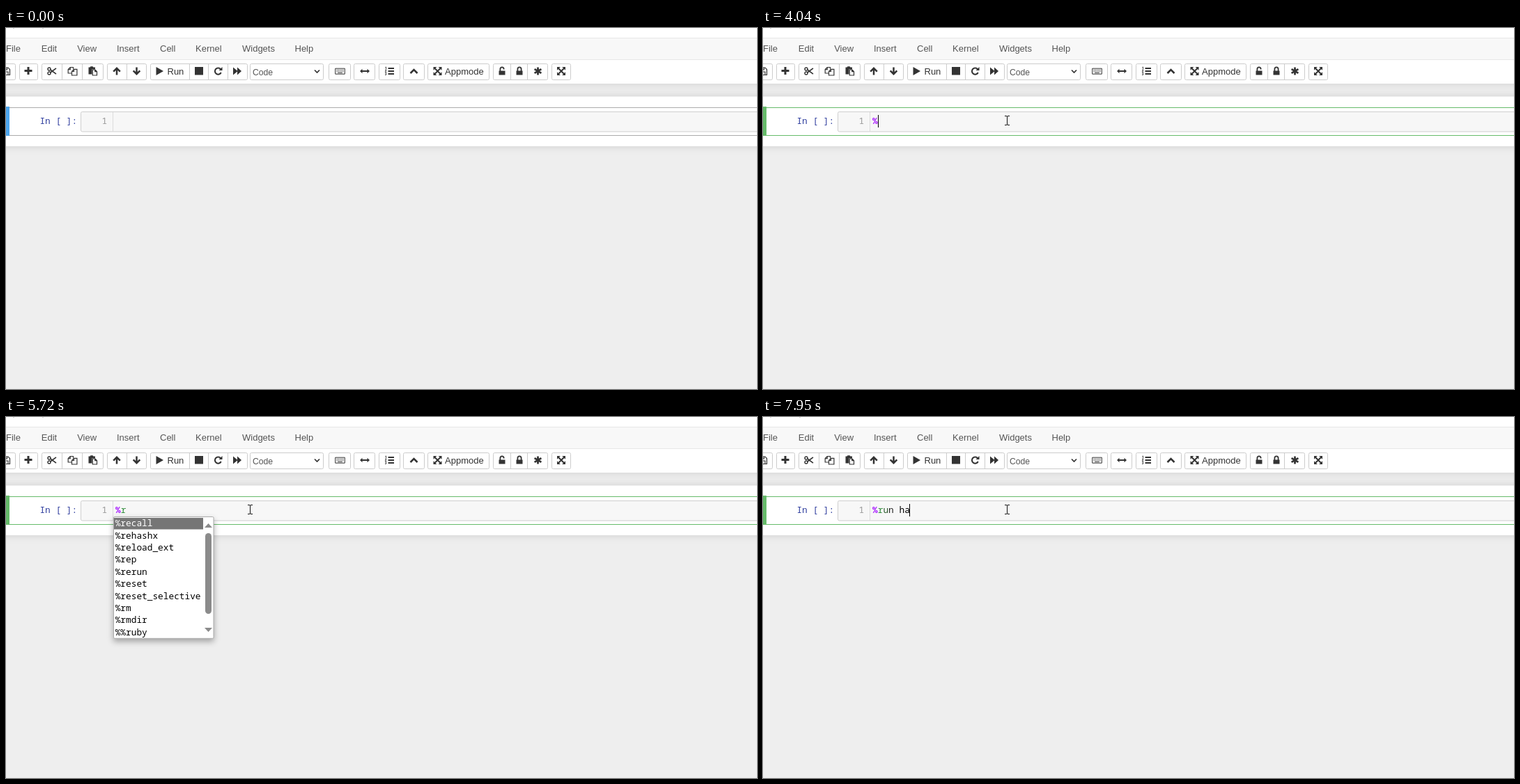
Animation, 1078 px wide and 519 px high, one loop 8 s. Source, as an HTML page:

```html
<!DOCTYPE html>
<html lang="en">
<head>
<meta charset="utf-8">
<title>Notebook cell</title>
<style>
  html, body { margin: 0; width: 100%; height: 100%; overflow: hidden; background: #eee; }
  svg { display: block; width: 1078px; height: 519px; }
  text { white-space: pre; }
  .ui { font: 13px "Liberation Sans", Arial, sans-serif; fill: #333; }
  .menu { fill: #555; }
  .mono { font: 12.8px "Noto Sans Mono", "DejaVu Sans Mono", monospace; }
  .panel { fill: #fff; filter: drop-shadow(0 0 6px rgba(87, 87, 87, .22)); }
  .btn { fill: #fff; stroke: #ccc; }
  .solid { fill: #333; }
  .line { fill: none; stroke: #333; }
  .list { filter: drop-shadow(0 4px 4px rgba(0, 0, 0, .32)); }
</style>
</head>
<body>
<svg id="stage" viewBox="0 0 1078 519">
  <rect width="1078" height="519" fill="#eee"/>
  <rect class="panel" x="-30" y="98.5" width="1140" height="71.5"/>
  <rect class="panel" x="-30" y="-30" width="1140" height="110"/>
  <rect y="14" width="1078" height="32" fill="#e7e7e7"/>
  <rect y="15" width="1078" height="30" fill="#f8f8f8"/>
  <path d="M10 0h2M52 0h2" stroke="#aaa"/>
  <g id="menu"></g>
  <g id="toolbar"></g>
  <path id="border" d="M0 114.5H1078M0 154.5H1078"/>
  <rect id="bar" y="113" width="5" height="42"/>
  <rect x="107.5" y="120.5" width="990" height="28.5" rx="2" fill="#f7f7f7" stroke="#cfcfcf"/>
  <path d="M153.5 121V149" stroke="#ddd"/>
  <text class="mono" x="48.4" y="138" fill="#303f9f">In [ ]:</text>
  <text class="mono" x="137.6" y="138" fill="#999">1</text>
  <text class="mono" id="code" x="157" y="138"></text>
  <rect id="caret" y="125" width="1" height="18"/>
  <g id="popup"></g>
  <path id="beam" fill="none" stroke="#111" d="M-3 -6.5H-1L0.5 -6L2 -6.5H4M0.5 -6V6M-3 6.5H-1L0.5 6L2 6.5H4"/>
  <path id="arrow" fill="#fff" stroke="#111" stroke-width=".9" d="M.5 .5V13L3.4 10.3L5.6 15.3L7.6 14.4L5.5 9.6H9.4Z"/>
</svg>
<script>
const LOOP = 8000;
const $ = id => document.getElementById(id);

// --- static chrome ---
const label = (x, y, s, cls = "ui", extra = "") => `<text class="${cls}" x="${x}" y="${y}" ${extra}>${s}</text>`;
const solid = d => `<path class="solid" d="${d}"/>`;
const line = (d, w = 1.2) => `<path class="line" stroke-width="${w}" d="${d}"/>`;
const at = (x, body) => `<g transform="translate(${x} 62)">${body}</g>`;

// Button group: left, right, inner dividers
const group = (l, r, ...cuts) =>
  `<rect class="btn" x="${l + .5}" y="51.5" width="${r - l}" height="23" rx="2"/>` +
  cuts.map(x => `<path stroke="#ccc" d="M${x + .5} 52V74"/>`).join("");

const turn = (d, a) => `<g transform="rotate(${a})">${d}</g>`;
const expand = line("M-4-4L4 4M4-4L-4 4", 2) +
  [0, 90, 180, 270].map(a => turn(solid("M-6-6H-1.2L-6-1.2Z"), a)).join("");
const upArrow = line("M0 5.5V-4M-4.8 .6L0-4.2L4.8 .6", 2.5);
const padlock = shackle => solid("M-4.5-.5H4.5V5.5H-4.5Z") + line(shackle, 1.8);

const icons = [
  [0, line("M-6-5H3L5.5-2.5V5.5H-6ZM-3.5 5V1H3V5M-3-5V-2H1.5V-5")],
  [32, solid("M-1.5-6H1.5V-2H5.5V1H1.5V5H-1.5V1H-5.5V-2H-1.5Z")],
  [66, line("M-2.2-2L6 4.2M-2.2 2L6-4.2", 1.6) +
    '<circle class="line" cx="-4" cy="-3" r="2" stroke-width="1.4"/><circle class="line" cx="-4" cy="3" r="2" stroke-width="1.4"/>'],
  [95.5, line("M-1 3H-6.3V-2.5L-3.3-5.5H1V-3M-3.2-5.5V-2.4H-6M-1 .3L2-2.7H6.4V6H-1ZM2-2.7V.4H-1")],
  [124.5, solid("M-6-5.5H-4L-3-6.8H0L1-5.5H3.5V-3H-1V4.5H-6Z") + line("M-.2-2.2H3.2L6 .6V6H-.2ZM3.2-2.2V.6H6")],
  [159, upArrow],
  [187.5, turn(upArrow, 180)],
  [220.5, solid("M-5-6L5.5 0L-5 6Z")],
  [277, solid("M-6-6H6V5.5H-6Z")],
  [304.5, line("M3.6-2.8A4.6 4.6 0 1 0 4.2 2", 2.1) + solid("M6-6V-1H1Z")],
  [332, solid("M-6-5.5L0-.5V-5.5L6 0L0 5.5V.5L-6 5.5Z")],
  [479.5, line("M-6.8-3.8H6.8V4.2H-6.8Z", 1) + line("M-5-1.8H5.5M-5 .2H5.5", 1.1).replace("/>", ' stroke-dasharray="1.3 .9"/>') + line("M-3.4 2.3H3.4", 1)],
  [515, line("M-5 0H5", 2) + solid("M-7 0L-3.5-3.2V3.2ZM7 0L3.5-3.2V3.2Z")],
  [550.5, line("M-2-4H6.5M-2 0H6.5M-2 4H6.5", 2) + line("M-6-5.6L-5-6V-2.4M-6.4-1.4H-4.6L-6.2 1.3H-4.2M-6.2 2.8H-4.6L-5.4 4L-4.4 5L-6.4 5.6", .9)],
  [585.5, line("M-5 3L0-2L5 3", 2.5)],
  [619.5, expand],
  [712, padlock("M-2.6 0V-3A2.6 2.6 0 0 1 2.6-3V-2.4")],
  [737, padlock("M-2.6 0V-3A2.6 2.6 0 0 1 2.6-3V0")],
  [763.5, line("M0-5.6V5.6M-4.9-2.8L4.9 2.8M4.9-2.8L-4.9 2.8", 2.7)],
  [797, expand]
];

$("menu").innerHTML = [["File", 0], ["Edit", 50.8], ["View", 102.2], ["Insert", 159], ["Cell", 221],
  ["Kernel", 272], ["Widgets", 339], ["Help", 414.5]].map(([s, x]) => label(x, 33.5, s, "ui menu")).join("");

$("toolbar").innerHTML = [[-10, 13], [19, 45], [51, 139, 80, 109], [145, 201, 173], [207, 346, 263, 290, 318],
  [350, 455], [463, 494], [499, 529], [535, 565], [570, 600], [605, 693], [699, 777, 724, 748], [783, 810]]
  .map(g => group(...g)).join("") + icons.map(([x, d]) => at(x, d)).join("") +
  label(231.5, 66.5, "Run") + label(630, 66.5, "Appmode") +
  label(354, 68, "Code", "ui", 'style="font-size:12.2px;fill:#555"') + at(446.5, line("M-3.5-1.5L0 2L3.5-1.5", 1.7));

// --- completion list ---
const ROW = 17.38;
function list(x, w, items, thumb) {
  const h = items.length * ROW + 1, inner = thumb ? w - 15 : w;
  let s = `<rect class="list" x="${x}" y="143.5" width="${w}" height="${h}" rx="1.5" fill="#fff" stroke="#ababab"/>` +
    `<rect x="${x + .5}" y="145" width="${inner - .5}" height="16.5" fill="#767676"/>`;
  items.forEach((item, i) => s += label(x + 2.2, 157.3 + i * ROW, item, "mono", `fill="${i ? "#000" : "#fff"}"`));
  if (thumb) s += `<rect x="286" y="167" width="9" height="${thumb}" rx="4.5" fill="#8b8b8b"/>` +
    '<path fill="#8b8b8b" d="M285 159L290.5 153L296 159ZM285 303L290.5 309L296 303Z"/>';
  return s;
}

const magics = "%%! %%HTML %%SVG %alias %alias_magic %autoawait %autocall %automagic %autosave %%bash".split(" ");
const rMagics = "%recall %rehashx %reload_ext %rep %rerun %reset %reset_selective %rm %rmdir %%ruby".split(" ");
const popups = [
  [0, ""],
  [4460, list(154.5, 143.5, magics, 17)],
  [5260, ""],
  [5400, list(154.5, 143.5, rMagics, 116)],
  [5910, ""],
  [6060, list(154.5, 51, ["%%ruby", "%run"])],
  [6380, ""],
  [7680, list(193, 96.5, ["harmonics.py"])],
  [7950, ""]
];

// --- timeline ---
const typed = "%run ha";
const keys = [4040, 5260, 5910, 6380, 6870, 7540, 7950];
const inks = ["#a2f", "#2e8b3a", "#2c5a2c", "#222"];
const caretOn = [[2060, 2580], [3090, 3620], [4040, 4590], [5120, 5720], [5910, 7400], [7540, LOOP]];

const clamp = v => Math.min(1, Math.max(0, v));
const ease = p => p * p * (3 - 2 * p);
const mix = (a, b, p) => Math.round(a + (b - a) * p);
// Progress that advances in n equal jumps, the first one at t0 and the last at t1
const steps = (t, t0, t1, n) => t < t0 ? 0 : clamp((Math.floor((t - t0) / (t1 - t0) * (n - 1) + 1e-6) + 1) / n);

function pointer(t) {
  const a = ease(steps(t, 680, 1420, 12)), b = steps(t, 1550, 1690, 3);
  return [mix(mix(943, 344, a), 350, b), mix(mix(500, 148, a), 133, b)];
}

const show = (el, on) => el.setAttribute("visibility", on ? "visible" : "hidden");
let shownPopup = "", shownCount = 0;

function draw(t) {
  const editing = t >= 1990;
  $("bar").setAttribute("fill", editing ? "#66bb6a" : "#4da6ee");
  $("border").setAttribute("stroke", editing ? "#66bb6a" : "#ababab");

  const count = keys.filter(k => t >= k).length;
  if (count !== shownCount) {
    shownCount = count;
    $("code").innerHTML = [...typed.slice(0, count)].map((c, i) =>
      `<tspan fill="${inks[i] || "#000"}"${i ? "" : ' font-weight="bold"'}>${c}</tspan>`).join("");
  }
  $("caret").setAttribute("x", Math.round(157 + count * 7.62));
  show($("caret"), caretOn.some(([a, b]) => t >= a && t < b));

  const popup = popups.filter(p => t >= p[0]).pop()[1];
  if (popup !== shownPopup) $("popup").innerHTML = shownPopup = popup;

  const [x, y] = pointer(t);
  const overText = y > 119 && y < 150;
  show($("beam"), t >= 540 && overText);
  show($("arrow"), t >= 540 && !overText);
  for (const id of ["beam", "arrow"]) $(id).setAttribute("transform", `translate(${x} ${y})`);
}

const start = performance.now();
function tick() {
  draw((performance.now() - start) % LOOP);
  requestAnimationFrame(tick);
}
tick();
</script>
</body>
</html>
```
